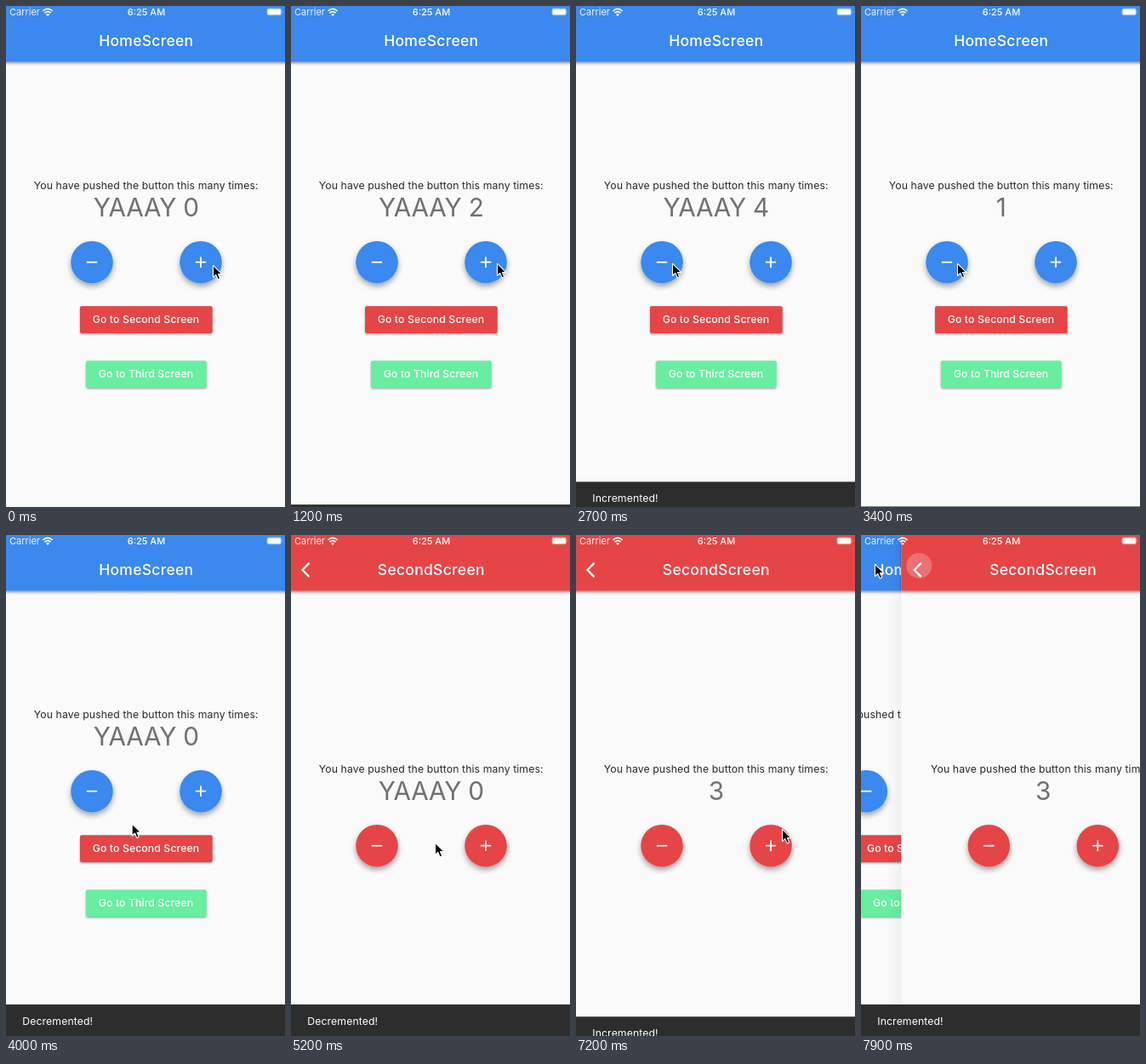
Recreate the animation shown at these times as an HTML page. Size 328 by 588 pixels, loop 8 s.

```html
<!DOCTYPE html>
<html lang="en">
<head>
<meta charset="utf-8">
<title>Counter app</title>
<style>
html, body { margin: 0; width: 100%; height: 100%; overflow: hidden; background: #fafafa; }
svg { display: block; width: 328px; height: 588px; font-family: Inter, sans-serif; }
.mid { text-anchor: middle; }
.title { font-size: 17.5px; font-weight: 500; letter-spacing: .29px; fill: #fff; }
.body { font-size: 12.25px; letter-spacing: .1px; fill: #2a2a2a; }
.count { font-size: 29.75px; letter-spacing: -.2px; fill: #717171; }
.label { font-size: 12.25px; font-weight: 500; letter-spacing: .1px; fill: #fff; }
.status { font-size: 11px; fill: #fff; }
.icon { fill: none; stroke: #fff; stroke-width: 1.8; }
</style>
</head>
<body>
<svg viewBox="0 0 328 588">
  <defs>
    <filter id="bar" x="-5%" y="-10%" width="110%" height="140%">
      <feDropShadow dx="0" dy="1.7" stdDeviation="1.7" flood-opacity=".42"/>
    </filter>
    <filter id="fab" x="-30%" y="-30%" width="160%" height="170%">
      <feDropShadow dx="0" dy="3.5" stdDeviation="3" flood-opacity=".36"/>
    </filter>
    <filter id="btn" x="-10%" y="-20%" width="120%" height="160%">
      <feDropShadow dx="0" dy="1.3" stdDeviation="1" flood-opacity=".36"/>
    </filter>
    <linearGradient id="edge">
      <stop offset="0" stop-color="#000" stop-opacity="0"/>
      <stop offset="1" stop-color="#000" stop-opacity=".04"/>
    </linearGradient>
  </defs>
  <g id="home"></g>
  <g id="second"></g>
  <g id="snack">
    <rect width="328" height="40" fill="#2d2d2d"/>
    <text id="note" class="body" x="19.3" y="24" style="fill:#fff"></text>
  </g>
  <g class="status">
    <text x="4" y="11" opacity=".9">Carrier</text>
    <text class="mid" x="165" y="11" font-weight="500">6:25 AM</text>
    <g fill="none" stroke="#fff" stroke-width="1.7">
      <path d="M43.4 5.8Q49 .9 54.6 5.8M45.4 8.1Q49 5 52.6 8.1"/>
    </g>
    <path d="M49 12.1L46.9 9.7Q49 8.2 51.1 9.7Z"/>
    <rect x="306.5" y="2.6" width="17.4" height="8.6" rx="2.4" fill-opacity=".45"/>
    <rect x="307.6" y="3.7" width="15.2" height="6.4" rx="1.4"/>
    <path d="M324.6 5.2Q326.2 6.9 324.6 8.6Z" opacity=".5"/>
  </g>
  <path id="cursor" d="M-.5 -.7v14.2l3.3-3l2.4 5.4l2.5-1.1l-2.3-5.2h4.5z"
        stroke="#fff" stroke-width="1.1" stroke-linejoin="round"/>
</svg>
<script>
const LOOP = 8000, STEP = 100, WIDTH = 328, SLIDE = 250, SNACK_H = 37;
const BLUE = '#3a88ee', RED = '#e54547', GREEN = '#67eea0';
const $ = id => document.getElementById(id);

// [time, value]
const counts = [[0, 0], [400, 1], [1000, 2], [1500, 3], [2000, 4], [2750, 3],
  [3000, 2], [3250, 1], [3500, 0], [6500, 1], [6800, 2], [7100, 3]];
// each note pushes the previous one out before sliding in
const notes = [[400 - SLIDE, 'Incremented!'], [990, 'Incremented!'], [1510, 'Incremented!'],
  [2030, 'Incremented!'], [2580, 'Decremented!'], [3130, 'Decremented!'],
  [6312, 'Incremented!'], [6850, 'Incremented!']];
// [time, x, y]
const pointer = [[0, 244, 305], [200, 243, 303], [2050, 243, 303], [2550, 114, 303],
  [3600, 114, 303], [4290, 170, 362], [5200, 170, 362], [6000, 243, 346],
  [7200, 243, 346], [7750, 17, 35], [LOOP, 17, 35]];
const PUSH = 4460, POP = 7877, NAV = 400, TAP = 7720;

const clamp = v => Math.min(1, Math.max(0, v));
const smooth = u => u * u * (3 - 2 * u);

function bezier(x1, y1, x2, y2) {
  const at = (a, b, s) => 3 * a * s * (1 - s) ** 2 + 3 * b * s * s * (1 - s) + s ** 3;
  return x => {
    let lo = 0, hi = 1;
    for (let i = 0; i < 30; i++) {
      const m = (lo + hi) / 2;
      if (at(x1, x2, m) < x) lo = m; else hi = m;
    }
    return at(y1, y2, (lo + hi) / 2);
  };
}
const slideEase = bezier(.4, 0, .2, 1), navEase = bezier(.35, .91, .33, .97);

const fab = (x, y, color, sign) => `
  <circle cx="${x}" cy="${y}" r="24.8" fill="${color}" filter="url(#fab)"/>
  <path class="icon" d="M${x - 6.2} ${y}h12.4${sign === '+' ? `M${x} ${y - 6.2}v12.4` : ''}"/>`;

const button = (x, y, w, color, text) => `
  <rect x="${x}" y="${y}" width="${w}" height="31.8" rx="2" fill="${color}" filter="url(#btn)"/>
  <text class="label mid" x="164.5" y="${y + 20}">${text}</text>`;

const page = (title, color, dy) => `
  <rect x="-2" width="332" height="588" fill="#fafafa"/>
  <rect x="-2" width="332" height="65.5" fill="${color}" filter="url(#bar)"/>
  <text class="title mid" x="164.8" y="47">${title}</text>
  <text class="body mid" x="164.7" y="${214.5 + dy}">You have pushed the button this many times:</text>
  <text class="count mid" x="164.8" y="${247 + dy}"></text>
  ${fab(101, 300.7 + dy, color, '-')}${fab(229, 300.7 + dy, color, '+')}`;

$('home').innerHTML = page('HomeScreen', BLUE, 0) +
  button(87, 352.3, 155.7, RED, 'Go to Second Screen') +
  button(94, 416.3, 141.7, GREEN, 'Go to Third Screen');
$('second').innerHTML = '<rect x="-18" width="16" height="588" fill="url(#edge)"/>' +
  page('SecondScreen', RED, 64) +
  '<circle id="ripple" cx="19" cy="36" fill="#fff" fill-opacity=".24"/>' +
  '<path class="icon" style="stroke-width:2.4" d="M21.4 32.9L13.5 41L21.4 49.1"/>';
const labels = document.querySelectorAll('.count');

const lastBefore = (list, t) => list.filter(e => e[0] <= t).length - 1;

function drawSnack(t) {
  const i = lastBefore(notes, t);
  let h = 0, text = '';
  if (i >= 0) {
    const age = t - notes[i][0], leaving = age < SLIDE;
    text = leaving ? (i ? notes[i - 1][1] : '') : notes[i][1];
    if (text) h = slideEase(leaving ? 1 - age / SLIDE : clamp(age / SLIDE - 1));
  }
  $('note').textContent = text;
  $('snack').setAttribute('transform', `translate(0 ${588 - SNACK_H * h})`);
  $('snack').style.display = h > 0 ? '' : 'none';
}

function drawPages(t) {
  const open = t < POP ? navEase(clamp((t - PUSH) / NAV)) : 1 - navEase(clamp((t - POP) / NAV));
  const shown = t >= PUSH;
  $('second').style.display = shown ? '' : 'none';
  $('second').setAttribute('transform', `translate(${WIDTH * (1 - open)} 0)`);
  $('home').setAttribute('transform', `translate(${shown ? -.34 * WIDTH * open : 0} 0)`);
  $('ripple').setAttribute('r', 15 * smooth(clamp((t - TAP) / 180)));
  const n = counts[lastBefore(counts, t)][1];
  labels.forEach(l => { l.textContent = n % 2 ? n : 'YAAAY ' + n; });
}

function drawCursor(t) {
  const i = lastBefore(pointer, t), [t0, x0, y0] = pointer[i], [t1, x1, y1] = pointer[i + 1];
  const u = smooth((t - t0) / (t1 - t0));
  $('cursor').setAttribute('transform', `translate(${x0 + (x1 - x0) * u} ${y0 + (y1 - y0) * u})`);
}

function draw(time) {
  const t = Math.floor(time % LOOP / STEP) * STEP;
  drawPages(t);
  drawSnack(t);
  drawCursor(t);
}

const start = performance.now();
function tick() {
  draw(performance.now() - start);
  requestAnimationFrame(tick);
}
tick();
</script>
</body>
</html>
```
